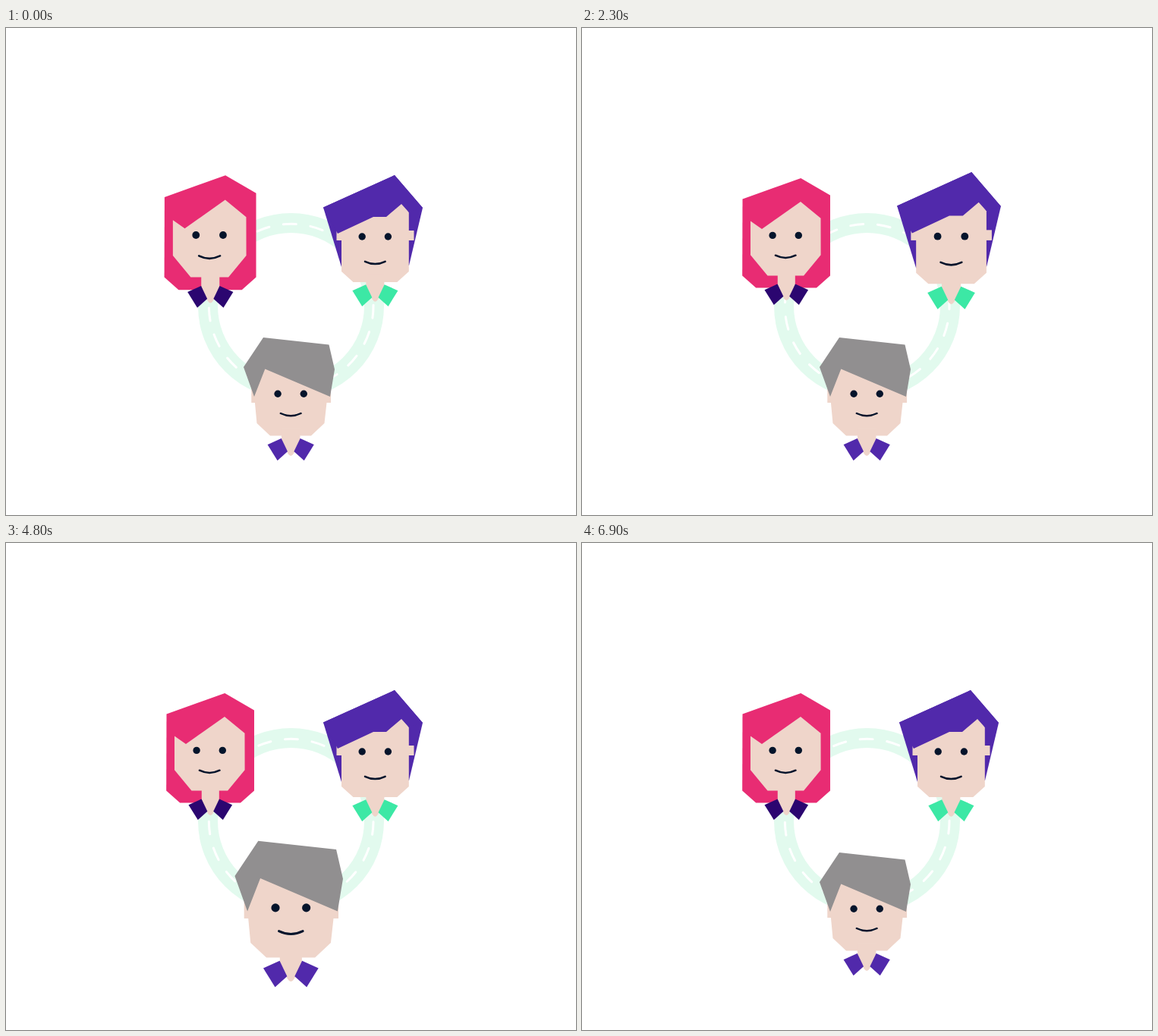
Recreate the animation shown at these times as an HTML page. Size 751 by 642 pixels, loop 7000 ms.

```html
<!DOCTYPE html>
<html lang="en">
<head>
<meta charset="utf-8">
<title>Sharing ideas</title>
<style>
html, body { margin: 0; width: 100%; height: 100%; overflow: hidden; background: #fff; }
svg { display: block; width: 100vw; height: 100vh; }
</style>
</head>
<body>
<svg id="stage" viewBox="0 0 751 642" xmlns="http://www.w3.org/2000/svg">
  <g fill="none">
    <circle cx="375.5" cy="366.5" r="109.5" stroke="#e2faee" stroke-width="26"/>
    <g id="dashes" stroke="#fff" stroke-width="3" stroke-linecap="round"></g>
  </g>
</svg>
<script>
const LOOP = 7000, TURN = 2300, DASHES = 19, GROW = 0.32;
const SKIN = '#efd5ca', INK = '#04142b', PURPLE = '#5129ab', METAL = '#d0cfd1';
const stage = document.getElementById('stage');
const dashes = document.getElementById('dashes');

function add(parent, tag, attrs) {
  const el = document.createElementNS('http://www.w3.org/2000/svg', tag);
  for (const key in attrs) el.setAttribute(key, attrs[key]);
  parent.appendChild(el);
  return el;
}
const poly = (parent, fill, points) => add(parent, 'polygon', { points, fill });
const rect = (parent, fill, x, y, width, height) =>
  add(parent, 'rect', { x, y, width, height, fill });

// A free top edge over a symmetric base with cut corners.
function block(parent, fill, top, x, half, bottom, cutX, cutY) {
  const side = bottom - cutY, foot = half - cutX;
  poly(parent, fill,
    `${top} ${x + half},${side} ${x + foot},${bottom} ${x - foot},${bottom} ${x - half},${side}`);
}

const people = [
  {
    cx: 270, cy: 283, face: 268.2, eyes: 273.4, mouth: 299.7,
    neck: [269.3, 337.5, 0.96], collar: '#2b0670', bulb: [272, 116.5],
    draw(g) {
      block(g, '#e82c73', '211.5,225.5 288.3,198 327,220.5', 269.1, 57.9, 342.5, 18, 16);
      block(g, SKIN, '222,254.5 237,265 288,229 314.5,250.7', 268.3, 46.3, 326.6, 22.5, 27.3);
    }
  },
  {
    cx: 483.6, cy: 282, face: 486.3, eyes: 275, mouth: 307.8,
    neck: [486.4, 338.2, 1], collar: '#3ce8a5', bulb: [491, 116.5],
    draw(g) {
      poly(g, PURPLE, '418,236.5 512,194 549,237 531,313 442,315');
      rect(g, SKIN, 435.5, 267, 102, 13);
      block(g, SKIN, '442,260 521,225 530.8,243', 486.4, 44.4, 335, 15.5, 14);
      poly(g, PURPLE, '418,236.5 512,194 549,237 530.8,243 521,232 501,249 484,249 437,271');
    }
  },
  {
    cx: 374.5, cy: 489, face: 375.2, eyes: 482.2, mouth: 508,
    neck: [375.2, 541, 1.02], collar: PURPLE, bulb: [377, 330.5],
    draw(g) {
      rect(g, SKIN, 323.3, 475, 104.7, 19);
      block(g, SKIN, '327,484 341,445 427,482 422.5,494', 375, 44.5, 537.5, 17.5, 16.5);
      poly(g, '#918f90', '339,408 425.5,417.5 433,450 427,486 341.3,449.5 327,486 313,447');
    }
  }
];

function buildHead(p) {
  p.head = add(stage, 'g', {});
  p.draw(p.head);
  const [x, y, k] = p.neck;
  const g = add(p.head, 'g', { transform: `translate(${x} ${y}) scale(${k})` });
  add(g, 'path', { fill: SKIN, d: 'M-12,-13 H12 V1 L4,19 Q0,26 -4,19 L-12,1 Z' });
  for (const side of [-1, 1]) {
    poly(g, p.collar, '30,8 12.2,0 4.1,17 17.2,28.7').setAttribute('transform', `scale(${side} 1)`);
    add(p.head, 'circle', { cx: p.face + side * 17.1, cy: p.eyes, r: 4.7, fill: INK });
  }
  p.smile = add(p.head, 'path', {
    fill: 'none', stroke: INK, 'stroke-width': 2.5, 'stroke-linecap': 'round'
  });
}

// Corners of a regular hexagon whose top tip is the origin.
function hexagon(r, corners) {
  return Array.from({ length: corners }, (_, i) => {
    const a = i * Math.PI / 3;
    return `${r * Math.sin(a)},${r - r * Math.cos(a)}`;
  }).join(' ');
}

function buildBulb(p) {
  const g = p.lamp = add(stage, 'g', {});
  add(g, 'polygon', { points: hexagon(35.2, 6), fill: '#ffeea0', stroke: '#fff',
    'stroke-width': 10, 'paint-order': 'stroke' });
  poly(g, '#ffe14a', hexagon(35.2, 4));
  add(g, 'path', {
    fill: '#fff',
    d: 'M-20.8,61 H20.8 V87 Q20.8,95 12.5,95 Q10,103.5 0,103.5 Q-10,103.5 -12.5,95 Q-20.8,95 -20.8,87 Z'
  });
  for (let i = 0; i < 4; i++) rect(g, METAL, -16, 61 + 8.8 * i, 32, 4);
  add(g, 'path', { fill: METAL, d: 'M-8,90 H8 V94 Q6,99 0,99 Q-6,99 -8,94 Z' });
  add(g, 'path', {
    d: 'M-21.5,36.5 A28,28 0 0 1 6,14', fill: 'none', stroke: '#fff',
    'stroke-width': 4.5, 'stroke-linecap': 'round'
  });
}

const ramp = (t, a, b) => Math.min(1, Math.max(0, (t - a) / (b - a)));
const wave = u => (1 - Math.cos(Math.PI * u)) / 2;
const soft = u => (u + wave(u)) / 2;

function pose(p, i, time) {
  const t = (time - i * TURN + 100 + LOOP) % LOOP - 100;
  const size = 1 + GROW * (soft(ramp(t, -100, 430)) - soft(ramp(t, 1800, 2300)));
  p.head.setAttribute('transform',
    `translate(${p.cx} ${p.cy}) scale(${size}) translate(${-p.cx} ${-p.cy})`);

  // The mouth is a circular arc that deepens from a shallow bow to a half circle.
  const joy = wave(ramp(t, 250, 550)) - wave(ramp(t, 1700, 2000));
  const y = p.mouth - 8.4 * joy, half = 13.3 - 1.6 * joy, depth = 3.1 + 8.3 * joy;
  const r = (half * half + depth * depth) / (2 * depth);
  p.smile.setAttribute('d', `M${p.face - half},${y} A${r},${r} 0 0 0 ${p.face + half},${y}`);

  const glow = wave(ramp(t, 350, 650)) - wave(ramp(t, 1750, 2050));
  const [bx, by] = p.bulb;
  p.lamp.setAttribute('transform', `translate(${bx} ${by + 95 * (1 - glow)}) scale(${glow})`);
  p.lamp.setAttribute('visibility', glow > 0.001 ? 'visible' : 'hidden');
}

function render(time) {
  dashes.setAttribute('transform', `translate(375.7 366.7) rotate(${-0.95 - 0.0274 * time})`);
  people.forEach((p, i) => pose(p, i, time));
}

for (let i = 0; i < DASHES; i++) {
  add(dashes, 'path', {
    d: 'M-8.5,-108 A108.3,108.3 0 0 1 8.5,-108',
    transform: `rotate(${i * 360 / DASHES})`
  });
}
people.forEach(buildHead);
people.forEach(buildBulb);

const begin = performance.now();
function tick() {
  render((performance.now() - begin) % LOOP);
  requestAnimationFrame(tick);
}
render(0);
requestAnimationFrame(tick);
</script>
</body>
</html>
```
